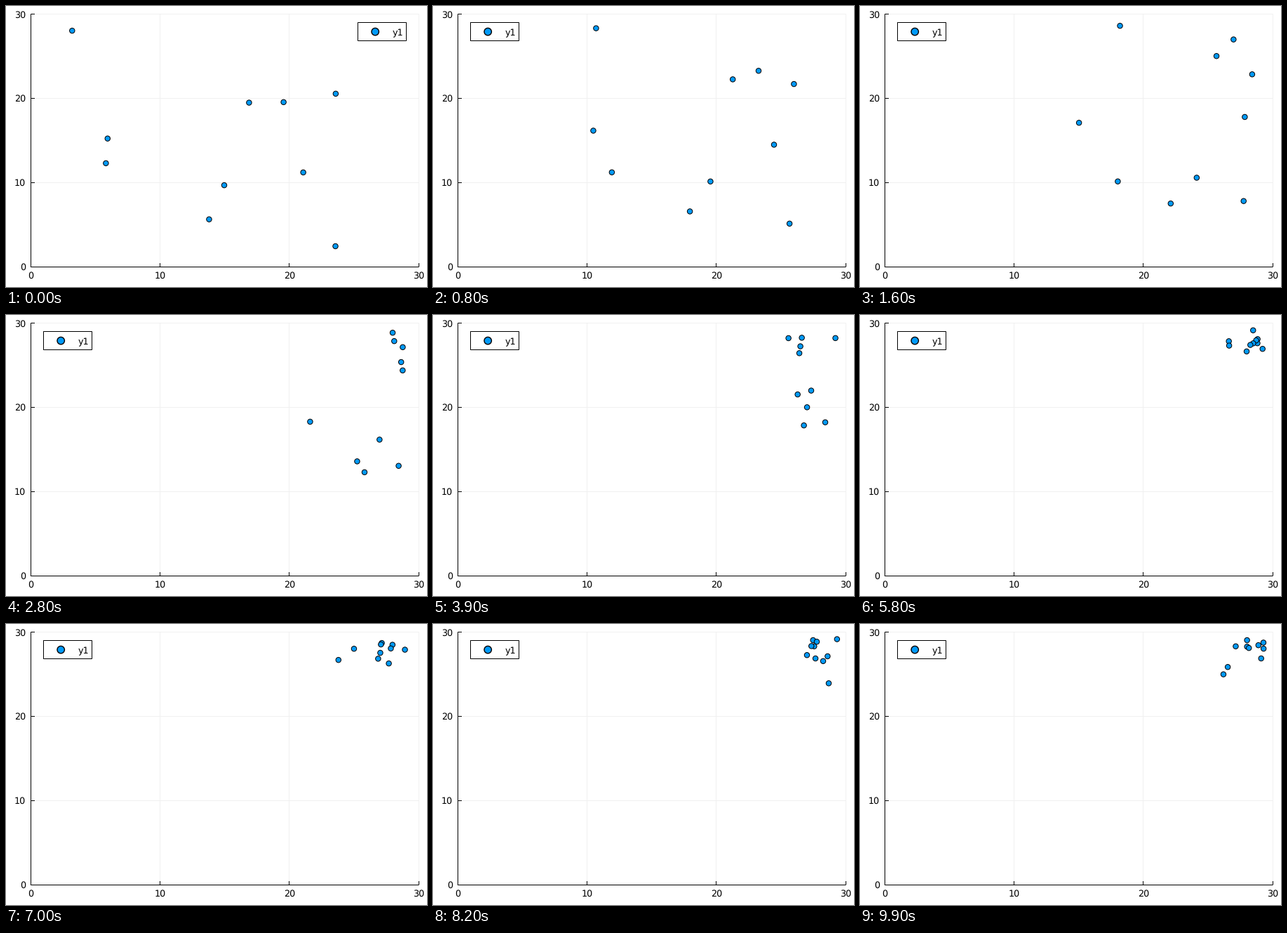
These frames come from a looping animation (600 px wide and 400 px high, 10000 ms). A matplotlib script:

```python
import numpy as np
import matplotlib.pyplot as plt
from matplotlib.animation import FuncAnimation
from matplotlib.patches import Circle, Rectangle

W, H, FRAMES = 600, 400, 100
PX = 0.72                                  # points per pixel at 100 dpi
LEFT, RIGHT, TOP, BOTTOM = 35.3, 588.2, 11.4, 371.2
BLUE = "#009af9"
LEGEND_SHIFT = 448

GOAL, WALL = np.array([28, 28]), 29.4
STRAIGHT = 16                              # steps before steering begins
CRUISE, TURN, NOISE = 0.5, 0.4, 0.25
# Where each walker starts and where its straight run ends
STARTS = np.array([
    (3.20, 28.02), (5.94, 15.22), (5.81, 12.29), (13.79, 5.63), (14.96, 9.68),
    (16.88, 19.48), (19.55, 19.54), (23.58, 20.54), (21.07, 11.20), (23.56, 2.44)])
RUN_ENDS = np.array([
    (18.19, 28.60), (15.02, 17.09), (18.02, 10.13), (22.11, 7.51), (24.12, 10.57),
    (25.65, 25.01), (26.97, 26.98), (28.41, 22.84), (27.84, 17.78), (27.75, 7.80)])


def unit(v):
    return v / np.maximum(np.linalg.norm(v, axis=1, keepdims=True), 1e-6)


def simulate():
    """Run straight, then steer to the goal (x first), bouncing off the walls."""
    rng = np.random.default_rng(4)
    pos = STARTS.copy()
    vel = (RUN_ENDS - STARTS) / STRAIGHT
    speed = np.linalg.norm(vel, axis=1, keepdims=True)
    path = [pos]
    for step in range(1, FRAMES):
        if step > STRAIGHT:
            gap = GOAL - pos
            aim = np.column_stack([0.6 * gap[:, 0] * abs(gap[:, 0]), gap[:, 1]])
            near = np.linalg.norm(gap, axis=1, keepdims=True) < 4
            wander = rng.normal(0, NOISE, pos.shape) * near
            speed = speed + 0.05 * (CRUISE - speed)
            vel = speed * unit(unit(vel) + TURN * unit(aim) + wander)
        pos = pos + vel
        hit = pos > WALL
        pos = np.where(hit, 2 * WALL - pos, pos)
        vel = np.where(hit, -vel, vel)
        path.append(pos)
    return np.array(path)


def to_px(x, y):
    return LEFT + (RIGHT - LEFT) * x / 30, BOTTOM + (TOP - BOTTOM) * y / 30


def crisp(v):
    return np.floor(v) + 0.5


path = np.stack(to_px(*np.moveaxis(simulate(), 2, 0)), axis=2)

plt.rcParams["font.family"] = "DejaVu Sans"
plt.rcParams["text.hinting"] = "none"
fig = plt.figure(figsize=(W / 100, H / 100), dpi=100, facecolor="white")
ax = fig.add_axes([0, 0, 1, 1])
ax.set_xlim(0, W)
ax.set_ylim(H, 0)
ax.axis("off")


def line(x0, y0, x1, y1, color="black", z=2):
    ax.plot([x0, x1], [y0, y1], color=color, lw=PX, zorder=z,
            solid_capstyle="butt", snap=False)


def label(x, y, text, ha, z=3):
    return ax.text(x, y, text, ha=ha, va="center_baseline",
                   fontsize=12.7 * PX, color="black", zorder=z)


def dot(x, y, r, z):
    return ax.add_patch(Circle((x, y), r, fc=BLUE, ec="black",
                               lw=PX * r / 3.7, zorder=z))


x0, y0 = crisp(LEFT), crisp(BOTTOM)
for v in (0, 10, 20, 30):
    x, y = to_px(v, v)
    gx, gy = crisp(x), crisp(y)
    line(gx, TOP, gx, BOTTOM, "#f0f0f0", 1)
    line(LEFT, gy, RIGHT, gy, "#f0f0f0", 1)
    line(gx, y0, gx, y0 - 5.5)
    line(x0, gy, x0 + 5.5, gy)
    label(x, 383.1, str(v), "center")
    label(27.8, y, str(v), "right")
line(x0, TOP, x0, y0 + 0.5)
line(x0 - 0.5, y0, RIGHT, y0)

dots = [dot(x, y, 3.7, 4) for x, y in path[0]]

box = ax.add_patch(Rectangle((53.5, 23.5), 69, 26, fc="white", ec="black",
                             lw=PX, zorder=5, snap=False))
key = dot(78.2, 36.6, 5.2, 6)
name = label(102.2, 37.2, "y1", "left", 6)


def update(i):
    for d, p in zip(dots, path[i]):
        d.center = p
    # The legend avoids the top left while a walker is there
    covered = np.any((path[i, :, 0] < 126) & (path[i, :, 1] < 54))
    shift = LEGEND_SHIFT if covered else 0
    box.set_x(53.5 + shift)
    key.center = (78.2 + shift, 36.6)
    name.set_x(102.2 + shift)
    return [*dots, box, key, name]


anim = FuncAnimation(fig, update, frames=FRAMES, interval=100, repeat=True,
                     repeat_delay=0, blit=False)
plt.show()
```
